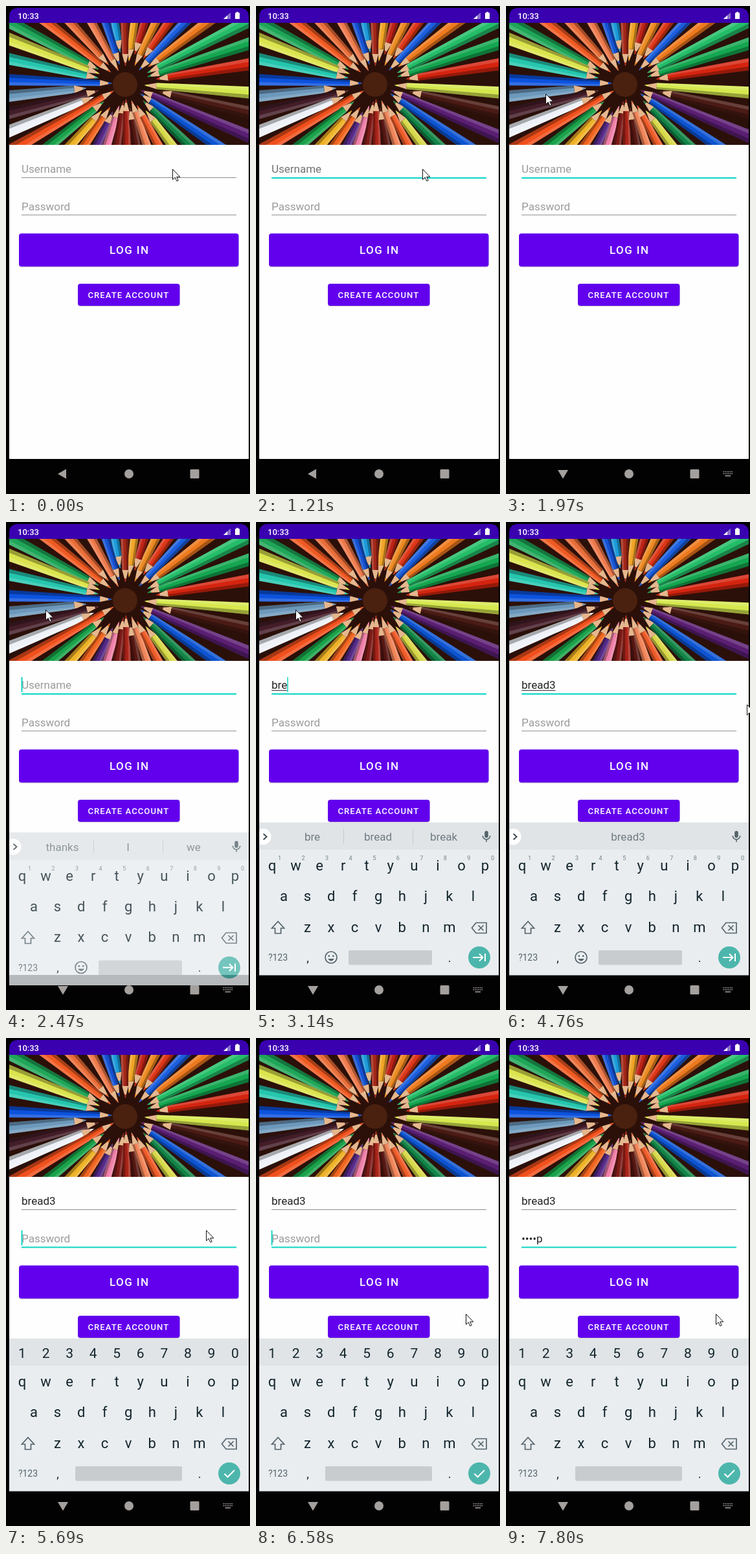
These frames come from a looping animation (377 by 752 pixels, 8000 ms). An HTML page:

```html
<!DOCTYPE html>
<html lang="en">
<head>
<meta charset="utf-8">
<title>Login screen</title>
<style>
  html, body { margin: 0; width: 100%; height: 100%; overflow: hidden; background: #000; }
  svg { display: block; width: 377px; height: 752px; }
  text { font-family: Roboto, "Open Sans", sans-serif; white-space: pre; }
</style>
</head>
<body>
<svg id="stage" viewBox="0 0 377 752" xmlns="http://www.w3.org/2000/svg"></svg>
<script>
const NS = "http://www.w3.org/2000/svg";
const LOOP = 8000;
const TEAL = "#0cd6c5";
const GREY = "#8c8c8c";
const HINT = "#9b9b9b";
const PRESSED = "#737373";
const stage = document.getElementById("stage");

function add(parent, tag, attrs = {}, content) {
  const el = document.createElementNS(NS, tag);
  set(el, attrs);
  if (content !== undefined) el.textContent = content;
  parent.appendChild(el);
  return el;
}
function set(el, attrs) {
  for (const k in attrs) el.setAttribute(k, attrs[k]);
}
const group = (parent, attrs) => add(parent, "g", attrs);
const rect = (parent, x, y, width, height, fill, rx = 0) =>
  add(parent, "rect", { x, y, width, height, fill, rx });
const circle = (parent, cx, cy, r, fill) => add(parent, "circle", { cx, cy, r, fill });
const path = (parent, d, fill) => add(parent, "path", { d, fill });
const line = (parent, d, stroke, width) =>
  add(parent, "path", { d, stroke, fill: "none", "stroke-width": width });
const label = (parent, x, y, size, fill, str, more = {}) =>
  add(parent, "text", { x, y, fill, "font-size": size, ...more }, str);
const centred = (parent, x, y, size, fill, str) =>
  label(parent, x, y, size, fill, str, { "text-anchor": "middle" });
const show = (el, on) => el.setAttribute("visibility", on ? "inherit" : "hidden");

function clip(id, x, y, width, height) {
  const c = add(stage, "clipPath", { id });
  add(c, "rect", { x, y, width, height });
  return `url(#${id})`;
}

// Angle, start of the painted body, colour
const pencils = [
  [-178, 40, "#0c52de"], [174, 80, "#6c98bb"], [166, 62, "#431d28"], [158, 72, "#eef2f8"],
  [150, 40, "#f1501c"], [141, 62, "#1aa24a"], [132, 74, "#eeb226"], [124, 62, "#f0641e"],
  [115, 66, "#562a86"], [107, 54, "#ef7fa8"], [98, 46, "#7c1b18"], [89, 42, "#a82318"],
  [80, 56, "#571712"], [71, 46, "#f08458"], [62, 56, "#ee5b28"], [53, 70, "#d7d848"],
  [44, 56, "#128446"], [34, 46, "#0d54d2"], [23, 44, "#5a1e72"], [13, 72, "#4a1b14"],
  [4, 48, "#d6e84e"], [-9, 66, "#d4240f"], [-18, 54, "#14a650"], [-27, 56, "#24bd68"],
  [-37, 62, "#ee7a1e"], [-46, 48, "#1b5ede"], [-55, 66, "#dc3617"], [-64, 50, "#ec8a22"],
  [-73, 66, "#bd2317"], [-82, 54, "#f0a426"], [-91, 46, "#a32718"], [-100, 68, "#1c9ad8"],
  [-108, 50, "#1552d2"], [-119, 42, "#ee7a4c"], [-132, 58, "#e96d38"], [-142, 48, "#f05a22"],
  [-152, 66, "#1fa658"], [-159, 62, "#dbe44c"], [-168, 62, "#25c6ae"]
];

function drawPhoto(parent) {
  const g = group(parent, { "clip-path": clip("photo", 5, 26, 370, 188) });
  rect(g, 5, 26, 370, 188, "#2b1009");
  const half = r => 3.4 + r * 0.03;
  for (const [angle, r, colour] of pencils) {
    const p = group(g, { transform: `translate(185 120) rotate(${angle})` });
    const a = half(r), b = half(235);
    const band = (from, to, fill) =>
      path(p, `M${r} ${a * from}L235 ${b * from}V${b * to}L${r} ${a * to}Z`, fill);
    path(p, `M${r - 19} 0L${r} ${-a}V${a}Z`, "#e5b78e");
    path(p, `M${r - 19} 0L${r - 13} -1.7V1.7Z`, colour);
    band(-1, 1, colour);
    band(-1, -0.4, "rgba(255,255,255,.16)");
    band(0.35, 1, "rgba(0,0,0,.3)");
  }
  circle(g, 184, 121, 19, "#4a200f");
}

function button(x, y, w, h, tx, ty, size, gap, str) {
  rect(stage, x, y + 1, w, h, "rgba(0,0,0,.2)", 4);
  rect(stage, x, y, w, h, "#6200ee", 4);
  label(stage, tx, ty, size, "#fff", str, { "font-weight": 500, "letter-spacing": gap });
}

function field(y, hint) {
  const f = {
    y,
    hint: label(stage, 24, y, 17, HINT, hint),
    text: label(stage, 24, y, 17, "#222", ""),
    rule: rect(stage, 24, y + 7, 332, 1, GREY),
    mark: rect(stage, 24, y + 2, 0, 1, "#333"),
    caret: rect(stage, 23.5, y - 18, 2, 23, TEAL)
  };
  return f;
}
function updateField(f, str, active, pressed, caret, marked) {
  f.text.textContent = str;
  const w = str ? f.text.getComputedTextLength() : 0;
  show(f.hint, !str);
  set(f.hint, { fill: pressed ? PRESSED : HINT });
  set(f.rule, { fill: active ? TEAL : GREY, height: active ? 2 : 1 });
  set(f.mark, { width: marked ? w : 0 });
  set(f.caret, { x: 23.5 + w + (w ? 0.5 : 0), width: w ? 1.5 : 2 });
  show(f.caret, caret);
}

// Screen
const screen = clip("screen", 5, 3, 370, 749);
path(stage, "M5 26V17Q5 3 19 3H361Q375 3 375 17V26Z", "#3a00b0");
rect(stage, 5, 214, 370, 484, "#fefefe");
label(stage, 18, 20, 13, "#fff", "10:33", { "font-weight": 500 });
path(stage, "M347 10V20H336Z", "#8a70d0");
path(stage, "M342 14.5V20H336Z", "#fff");
path(stage, "M354 10.5H356V9H359V10.5H361V20H354Z", "#fff");
drawPhoto(stage);
const user = field(257, "Username");
const pass = field(314.5, "Password");
button(20, 350.5, 339.5, 51, 160, 382, 17, 1.4, "LOG IN");
button(111, 428, 157.5, 34, 126.5, 450, 13.1, 1.05, "CREATE ACCOUNT");

// Navigation bar
const NAV = "#a3a09e";
rect(stage, 0, 698, 377, 54, "#030202");
const back = path(stage, "M93 713.5V728.5L80 721Z", NAV);
const down = group(stage);
path(down, "M80 715H96L88 728.5Z", NAV);
for (let i = 0; i < 6; i++) {
  rect(down, 335.5 + i * 2.6, 717, 1.5, 1.5, NAV);
  rect(down, 335.5 + i * 2.6, 720, 1.5, 1.5, NAV);
}
rect(down, 338.5, 723.3, 8.5, 1.5, NAV);
circle(stage, 190, 721, 7, NAV);
rect(stage, 284.5, 714, 14, 14, NAV, 1.5);

// Keyboard
const INK = "#13252c";
const SOFT = "#55646b";
const kb = group(group(stage, { "clip-path": screen }));
rect(kb, 5, 463, 370, 235.5, "#e9edf0");
rect(kb, 5, 463, 370, 42, "#e0e4e7");

const STEP = 36.55;
const row = (parent, str, x, y, size, fill) =>
  [...str].forEach((c, i) => centred(parent, x + i * STEP, y, size, fill, c));
row(kb, "qwertyuiop", 25, 537, 22, INK);
row(kb, "asdfghjkl", 43, 584, 22, INK);
row(kb, "zxcvbnm", 79.5, 631.5, 22, INK);
centred(kb, 34, 676, 14, SOFT, "?123");
centred(kb, 80, 677.5, 18, INK, ",");
centred(kb, 299, 677.5, 18, INK, ".");
line(kb, "M34 615.5L24.5 626H29.5V634H38.5V626H43.5Z", SOFT, 1.7);
line(kb, "M340 617.5H356V633.5H340L333.5 625.5ZM343.5 621.5L351.5 629.5M351.5 621.5L343.5 629.5", SOFT, 1.7);
const space = rect(kb, 143, 660, 129, 22.5, "#c8cccf", 2);
circle(kb, 345, 671, 17, "#4db6ac");

const words = group(kb);
row(words, "1234567890", 36.5, 521, 9, "#748087");
const slots = [87, 188.5, 290].map(x => centred(words, x, 491, 17, "#6f7b81", ""));
const bars = group(words);
for (const x of [135, 242]) rect(bars, x, 473, 1, 23, "#c3c9cd");
circle(words, 11, 485, 12.5, "#fff");
line(words, "M11.5 480.5L16.5 485L11.5 489.5", "#37464d", 1.8);
rect(words, 353.2, 476, 5.6, 10.5, SOFT, 2.8);
line(words, "M350.3 483.5A5.7 5.7 0 0 0 361.7 483.5M356 489V493", SOFT, 1.6);
add(words, "circle", { cx: 116, cy: 671, r: 9, fill: "none", stroke: SOFT, "stroke-width": 1.7 });
circle(words, 112.8, 668.8, 1.4, SOFT);
circle(words, 119.2, 668.8, 1.4, SOFT);
path(words, "M111 673H121Q116 680 111 673Z", SOFT);
line(words, "M335 671H350M345 665.5L350.5 671L345 676.5M354 665V677", "#fff", 2);

const digits = group(kb);
row(digits, "1234567890", 25, 493, 21, INK);
line(digits, "M337.5 671.5L342.5 676.5L353 666", "#fff", 2);

const mouse = add(stage, "path", {
  d: "M0 0V16L3.7 12.6L6.3 18.3L8.7 17.2L6.2 11.8H11.3Z",
  fill: "#fff", stroke: "#111", "stroke-width": 1
});

// Each entry changes part of the state at its time
const events = [
  [0, { x: 257.5, y: 251.5, user: "", pass: "", focus: "", press: "", caret: false,
        nav: false, lift: 0, alpha: 0, words: [], mark: false, secret: false }],
  [1210, { focus: "user", press: "user" }],
  [1350, { press: "", caret: true }],
  [1730, { x: 140, y: 190, nav: true }],
  [1850, { x: 16.5, y: 117.5, caret: false }],
  [1970, { x: 61.5, y: 135.5 }],
  [2350, { caret: true }],
  [2470, { lift: 15.5, alpha: 0.78, words: ["thanks", "I", "we"] }],
  [2590, { lift: 3, alpha: 0.96 }],
  [2710, { lift: 0, alpha: 1 }],
  [2830, { user: "br", mark: true, words: ["br", "bring", "brown"] }],
  [3140, { user: "bre", words: ["bre", "bread", "break"] }],
  [3270, { user: "bread", words: ["breads", "bread", "break"] }],
  [3770, { caret: false }],
  [4250, { user: "bread3", caret: true, words: ["", "bread3", ""] }],
  [4640, { x: 11.5, y: 129.5 }],
  [4760, { x: 372.5, y: 281.5, caret: false }],
  [4880, { x: 331.5, y: 279.5 }],
  [5030, { x: 311.5, y: 292.5 }],
  [5170, { x: 309.5, y: 296.5, caret: true }],
  [5430, { press: "pass" }],
  [5690, { focus: "pass", press: "", mark: false, secret: true }],
  [5970, { x: 312.5, y: 318.5 }],
  [6090, { x: 318.5, y: 365.5 }],
  [6210, { x: 323.5, y: 412.5, caret: false }],
  [6330, { x: 324.5, y: 425.5 }],
  [6580, { caret: true }],
  [6830, { pass: "s" }],
  [7150, { pass: "•••m" }],
  [7270, { pass: "••••p" }],
  [7800, { caret: false }]
];

function draw(t) {
  const s = {};
  for (const [at, change] of events) if (at <= t) Object.assign(s, change);
  const on = name => s.focus === name;
  updateField(user, s.user, on("user"), s.press === "user", on("user") && s.caret, s.mark);
  updateField(pass, s.pass, on("pass") || s.press === "pass", s.press === "pass", on("pass") && s.caret, false);
  show(back, !s.nav);
  show(down, s.nav);
  set(kb, { transform: `translate(0 ${s.lift})`, opacity: s.alpha });
  show(words, !s.secret);
  show(digits, s.secret);
  show(bars, Boolean(s.words[0]));
  slots.forEach((el, i) => { el.textContent = s.words[i] || ""; });
  set(space, s.secret ? { x: 107, width: 165 } : { x: 143, width: 129 });
  set(mouse, { transform: `translate(${s.x} ${s.y})` });
}

const start = performance.now();
function tick() {
  draw((performance.now() - start) % LOOP);
  requestAnimationFrame(tick);
}
tick();
</script>
</body>
</html>
```
